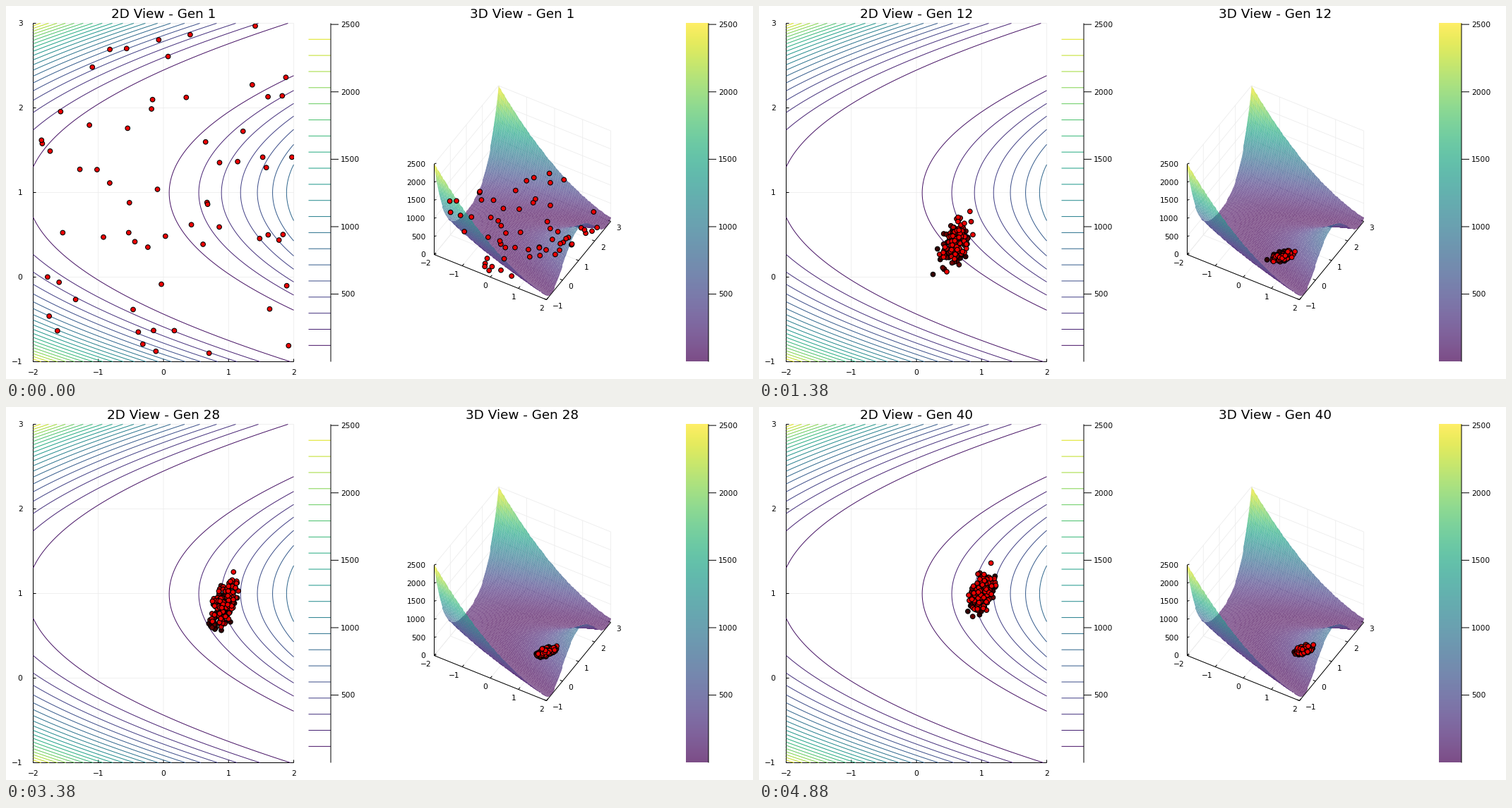
Animation of 1058 by 529 pixels, one loop 5010 ms. Source, as a matplotlib script:

```python
import numpy as np
import matplotlib.pyplot as plt
from matplotlib.animation import FuncAnimation
from matplotlib.patches import Rectangle

W, H, DPI = 1058, 529, 100
STEP_MS, STEPS = 30, 167               # one loop of 5010 ms
GENS, GEN_MS = 40, 125
Z_MAX = 2509
SHADES = (0.93, 0.8, 0.4, 0.2)         # red level by age in generations

plt.rcParams["font.family"] = "DejaVu Sans"


def pt(px):
    return px * 72 / DPI


def banana(x, y):
    return (1 - x) ** 2 + 100 * (y - x ** 2) ** 2


def landscape(x, y):
    """The drawn height field has its two axes swapped."""
    return banana(y - 1, x + 1)


def flat(x, y):
    return 38 + (x + 2) * 92.25, 384 - y * 120


def solid(x, y, z):
    u, v = x + 2, y + 1
    return 606 + 39.75 * u + 22.75 * v, 352 + 16 * u - 27.75 * v - 0.0514 * z


def bar_y(z):
    return 503.7 - z * 0.19123


def num(n):
    return str(n).replace("-", "\u2212")


# ---------------------------------------------------------------- population

def born(gen):
    """Uniform at first, then a shrinking cloud that climbs the valley."""
    rng = np.random.default_rng(100 + gen)
    if gen == 1:
        return rng.uniform((-2, -1), (2, 3), (63, 2))
    n = min(65, 16 + 3 * gen)
    spread = np.exp((1 - gen) / 2.6)
    a, b = np.clip(rng.standard_t(4 + gen, (2, n)), -2.6, 2.6)
    mid = np.interp(gen, [1, 4, 7, 12, 18, 28, 40],
                    [0, 0.2, 0.5, 0.63, 0.78, 0.96, 1.01])
    x = mid + (0.08 + 0.75 * spread) * a
    y = mid ** 2 + 0.1 * np.exp((1 - gen) / 10)
    y = y + (0.11 + 0.5 * spread) * (0.45 * a + 0.89 * b)
    return np.column_stack([np.clip(x, -2, 2), np.clip(y, -1, 3)])


def population(gen):
    """Visible members, oldest first, and their colours."""
    groups, reds = [], []
    for g in range(max(1, gen - len(SHADES) + 1), gen + 1):
        groups.append(BORN[g])
        reds += [SHADES[gen - g]] * len(BORN[g])
    colours = np.zeros((len(reds), 3))
    colours[:, 0] = reds
    return np.vstack(groups), colours


BORN = {g: born(g) for g in range(1, GENS + 1)}


# --------------------------------------------------------------------- stage

fig = plt.figure(figsize=(W / DPI, H / DPI), dpi=DPI, facecolor="white")


def pixel_axes():
    """Full-figure axes whose whole numbers are pixel centres."""
    axes = fig.add_axes([0, 0, 1, 1])
    axes.axis("off")
    return axes


def fit(axes):
    axes.set_aspect("auto")
    axes.set_xlim(-0.5, W - 0.5)
    axes.set_ylim(H - 0.5, -0.5)


def line(a, b, color="black", width=1.0, z=2):
    ax.plot([a[0], b[0]], [a[1], b[1]], color=color, lw=pt(width),
            zorder=z, solid_capstyle="butt", snap=False)


def grid(a, b):
    line(a, b, "#ececec", 0.8, 1)


def label(axes, x, y, text, ha="center", size=10.6):
    return axes.text(x, y + 0.365 * size, text, ha=ha, va="baseline",
                     fontsize=pt(size), zorder=6)


def draw_flat():
    for x in range(-2, 3):
        px = flat(x, 0)[0]
        grid((px, 24), (px, 504))
        line((px, 504), (px, 500))
        label(ax, px, 519, num(x))
    for y in range(-1, 4):
        py = flat(0, y)[1]
        grid((38, py), (407, py))
        line((38, py), (42, py))
        label(ax, 23, py, num(y), "right")
    line((38, 24), (38, 504.5))
    line((37.5, 504), (407, 504))

    x, y = np.meshgrid(np.linspace(-2, 2, 201), np.linspace(-1, 3, 201))
    levels = Z_MAX / 21 * np.arange(1, 21)
    colours = plt.cm.viridis(levels / Z_MAX)
    ax.contour(*flat(x, y), landscape(x, y), levels=levels, colors=colours,
               linewidths=pt(1), zorder=3)
    for z, c in zip(levels, colours):
        line((428, bar_y(z)), (459.5, bar_y(z)), c, 1)


def draw_bar_axis(x):
    line((x, 24), (x, 504))
    for z in range(500, 2501, 500):
        line((x, bar_y(z)), (x + 11, bar_y(z)))
        label(ax, x + 14, bar_y(z), num(z), "left")


def draw_solid():
    for x in range(-2, 3):
        grid(solid(x, 3, 0), solid(x, 3, 2500))
        grid(solid(x, -1, 0), solid(x, 3, 0))
        px, py = solid(x, -1, 0)
        line((px, py), (px + 2.3, py - 2.8))
        label(ax, px - 3.5, py + 12, num(x), "right")
    for y in range(-1, 4):
        grid(solid(-2, y, 0), solid(-2, y, 2500))
        grid(solid(-2, y, 0), solid(2, y, 0))
        px, py = solid(2, y, 0)
        line((px, py), (px - 3.5, py - 1.4))
        label(ax, px + 8, py + 8.8, num(y), "left")
    for z in range(0, 2501, 500):
        grid(solid(-2, -1, z), solid(-2, 3, z))
        grid(solid(-2, 3, z), solid(2, 3, z))
        px, py = solid(-2, -1, z)
        line((px, py), (px + 3, py - 1))
        label(ax, 594, py, num(z), "right")
    corner = solid(-2, -1, 0)
    line(corner, solid(-2, -1, 2500))
    line(corner, solid(2, -1, 0))
    line(solid(2, -1, 0), solid(2, 3, 0))

    # rows run back to front so nearer cells cover farther ones
    x, y = np.meshgrid(np.linspace(-2, 2, 100), np.linspace(3, -1, 100))
    z = landscape(x, y)
    mean = (z[1:, 1:] + z[:-1, 1:] + z[1:, :-1] + z[:-1, :-1]) / 4
    ax.pcolormesh(*solid(x, y, z), mean, cmap="viridis", vmin=0, vmax=Z_MAX,
                  alpha=0.7, antialiased=True, edgecolors="none", zorder=3)


ax = pixel_axes()
draw_flat()
draw_bar_axis(459.5)
draw_solid()
ax.imshow(np.linspace(1, 0, 256)[:, None], cmap="viridis", alpha=0.7,
          extent=(962.5, 994.5, 503.5, 23.5), zorder=2)
draw_bar_axis(994.5)
fit(ax)

# the still layer is drawn once and kept as a picture
fig.canvas.draw()
still = np.array(fig.canvas.buffer_rgba())
ax.remove()

top = pixel_axes()
top.imshow(still, extent=(-0.5, W - 0.5, H - 0.5, -0.5),
           interpolation="nearest", zorder=0)
fit(top)

titles = [label(top, x, 9.5, "", size=18.4) for x in (222.5, 730.5)]
dot = dict(s=pt(6.6) ** 2, edgecolors="black", linewidths=pt(1.1), zorder=5)
flat_dots = top.scatter([], [], **dot)
solid_dots = top.scatter([], [], **dot)
flat_dots.set_clip_path(Rectangle((38, 24), 369, 480, transform=top.transData))


def update(step):
    # steps do not divide a generation evenly, so look slightly ahead
    gen = min(GENS, (step * STEP_MS + 20) // GEN_MS + 1)
    members, colours = population(gen)
    x, y = members.T
    flat_dots.set_offsets(np.column_stack(flat(x, y)))
    solid_dots.set_offsets(np.column_stack(solid(x, y, banana(x, y))))
    for dots in (flat_dots, solid_dots):
        dots.set_facecolor(colours)
    for title, kind in zip(titles, ("2D", "3D")):
        title.set_text(f"{kind} View - Gen {gen}")
    return [flat_dots, solid_dots, *titles]


anim = FuncAnimation(fig, update, frames=STEPS, interval=STEP_MS,
                     init_func=lambda: update(0), repeat=True,
                     repeat_delay=0, blit=False)
plt.show()
```
